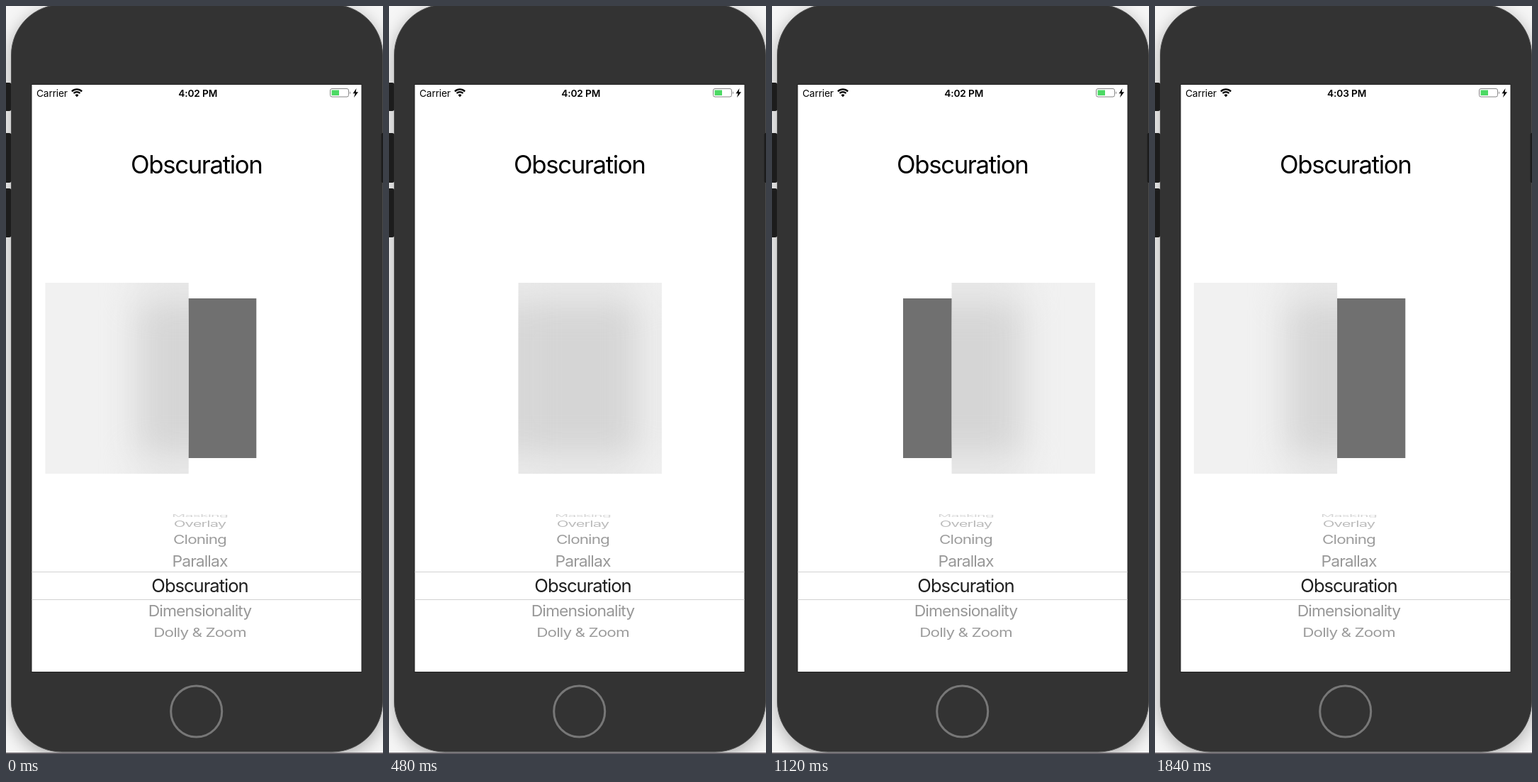
Write an HTML page that moves like this. It is 532 px wide and 1054 px high and loops after 1920 ms.

```html
<!DOCTYPE html>
<html lang="en">
<head>
<meta charset="utf-8">
<title>Obscuration</title>
<style>
  html, body { margin: 0; width: 100%; height: 100%; overflow: hidden; background: #f6f6f6; }
  svg { display: block; }
  text { font-family: Inter, "Liberation Sans", sans-serif; text-anchor: middle; letter-spacing: -.04em; }
  .status { font-size: 13.7px; letter-spacing: -.01em; }
  #body { filter: drop-shadow(0 6px 12px rgba(0, 0, 0, .3)); }
  #ghost { filter: blur(25px); }
</style>
</head>
<body>
<svg id="stage" width="532" height="1054" viewBox="0 0 532 1054">
  <defs><clipPath id="wheelClip"><rect x="36" y="716" width="466" height="220"/></clipPath></defs>

  <!-- Phone -->
  <rect id="body" x="7.5" y="-2" width="524" height="1053" rx="71" fill="#333" stroke="#4c4c4c"/>
  <g fill="#1c1c1c">
    <rect x="-3" y="108" width="10.5" height="40" rx="3"/>
    <rect x="-3" y="179" width="10.5" height="70" rx="3"/>
    <rect x="-3" y="257" width="10.5" height="69" rx="3"/>
    <rect x="529.5" y="179" width="6" height="70" rx="2"/>
  </g>
  <rect y="1052" width="532" height="2" fill="#68646a"/>
  <rect x="36" y="110.5" width="466" height="828" fill="#fff" stroke="#222"/>
  <circle cx="268.7" cy="994" r="36" fill="none" stroke="#777" stroke-width="3"/>

  <!-- Status bar -->
  <text class="status" x="43" y="127.6" style="text-anchor:start">Carrier</text>
  <text class="status" id="clock" x="270.7" y="127.6" font-weight="600"></text>
  <g fill="none" stroke="#000" stroke-width="2.3">
    <path d="M92.9 120.4A10 10 0 0 1 107.1 120.4M95.5 123A6.3 6.3 0 0 1 104.5 123"/>
    <path d="M100 128.2L97.5 125.4A3.6 3.6 0 0 1 102.5 125.4Z" fill="#000" stroke="none"/>
  </g>
  <rect x="457.5" y="116.5" width="26" height="11.5" rx="2.5" fill="none" stroke="#858585"/>
  <rect x="459.5" y="118.5" width="10.5" height="7.5" fill="#4cd964"/>
  <path d="M485 120.2q2 2 0 4z" fill="#777"/>
  <path d="M494.5 116L489.5 123.2H492.6L491 129L497 121.3H493.6Z"/>

  <text x="268.7" y="235.5" font-size="34.8">Obscuration</text>

  <!-- Dark card and the frosted panel sliding over it -->
  <rect x="185" y="412" width="168.3" height="225" fill="#707070"/>
  <svg id="panel" y="390" width="202.5" height="269.3" overflow="hidden">
    <rect width="202.5" height="269.3" fill="#f1f1f1"/>
    <path id="ghost" fill="#d5d5d5"/>
  </svg>

  <!-- Picker -->
  <path d="M36.5 797.5H501.5M36.5 836.5H501.5" stroke="#d2d2d2"/>
  <g id="wheel" clip-path="url(#wheelClip)">
    <text x="273.5" y="826.3" font-size="25.6" fill="#1f1f1f">Obscuration</text>
  </g>
</svg>
<script>
const LOOP = 1920, STEP = 80;
const PANEL = { min: 54.5, range: 225, width: 202.5, height: 269.3, top: 390 };
const CARD = { left: 185, right: 353.3, top: 412, bottom: 637 };
const byId = id => document.getElementById(id);

// Rows lie on a cylinder seen with slight perspective.
function addRow(label, index) {
  const angle = index * 19.5 * Math.PI / 180;
  const depth = 1 - Math.cos(angle);
  const y = 817 + 105 * Math.sin(angle) / (1 + .047 * depth);
  const row = document.createElementNS('http://www.w3.org/2000/svg', 'text');
  row.textContent = label;
  row.setAttribute('y', 8.4);
  row.setAttribute('font-size', 23);
  row.setAttribute('fill', ['', '#989898', '#9c9c9c', '#bcbcbc', '#d6d6d6'][Math.abs(index)]);
  row.setAttribute('transform', `translate(273.5 ${y}) scale(${1 / (1 + .1 * depth)} ${Math.cos(angle)})`);
  byId('wheel').append(row);
}
['Masking', 'Overlay', 'Cloning', 'Parallax'].forEach((label, i) => addRow(label, i - 4));
['Dimensionality', 'Dolly & Zoom'].forEach((label, i) => addRow(label, i + 1));

// cubic-bezier(.42, 0, .58, 1), solved by bisection
function easeInOut(x) {
  let low = 0, high = 1, s;
  for (let i = 0; i < 24; i++) {
    s = (low + high) / 2;
    const bx = 1.26 * (1 - s) ** 2 * s + 1.74 * (1 - s) * s * s + s ** 3;
    if (bx < x) low = s; else high = s;
  }
  return s * s * (3 - 2 * s);
}

// The blur samples its backdrop mirrored at the panel edges.
const mirrored = (a, b, size) => [[-b, -a], [a, b], [2 * size - b, 2 * size - a]];
const clamp = (v, max) => Math.min(Math.max(v, 0), max);

function ghostPath(left) {
  const xs = mirrored(clamp(CARD.left - left, PANEL.width), clamp(CARD.right - left, PANEL.width), PANEL.width);
  const ys = mirrored(CARD.top - PANEL.top, CARD.bottom - PANEL.top, PANEL.height);
  return xs.flatMap(([a, b]) => ys.map(([c, d]) => `M${a} ${c}H${b}V${d}H${a}Z`)).join('');
}

function draw(now) {
  const step = Math.floor(now % LOOP / STEP);
  // The motion skips slightly ahead in mid-swing.
  const phase = .083 * step + (step < 8 ? .042 : .075);
  const left = PANEL.min + PANEL.range * easeInOut(phase < 1 ? phase : 2 - phase);
  byId('panel').setAttribute('x', left);
  byId('ghost').setAttribute('d', ghostPath(left));
  byId('clock').textContent = step < 17 ? '4:02 PM' : '4:03 PM';
}

const start = performance.now();
function tick() {
  draw(performance.now() - start);
  requestAnimationFrame(tick);
}
tick();
</script>
</body>
</html>
```
